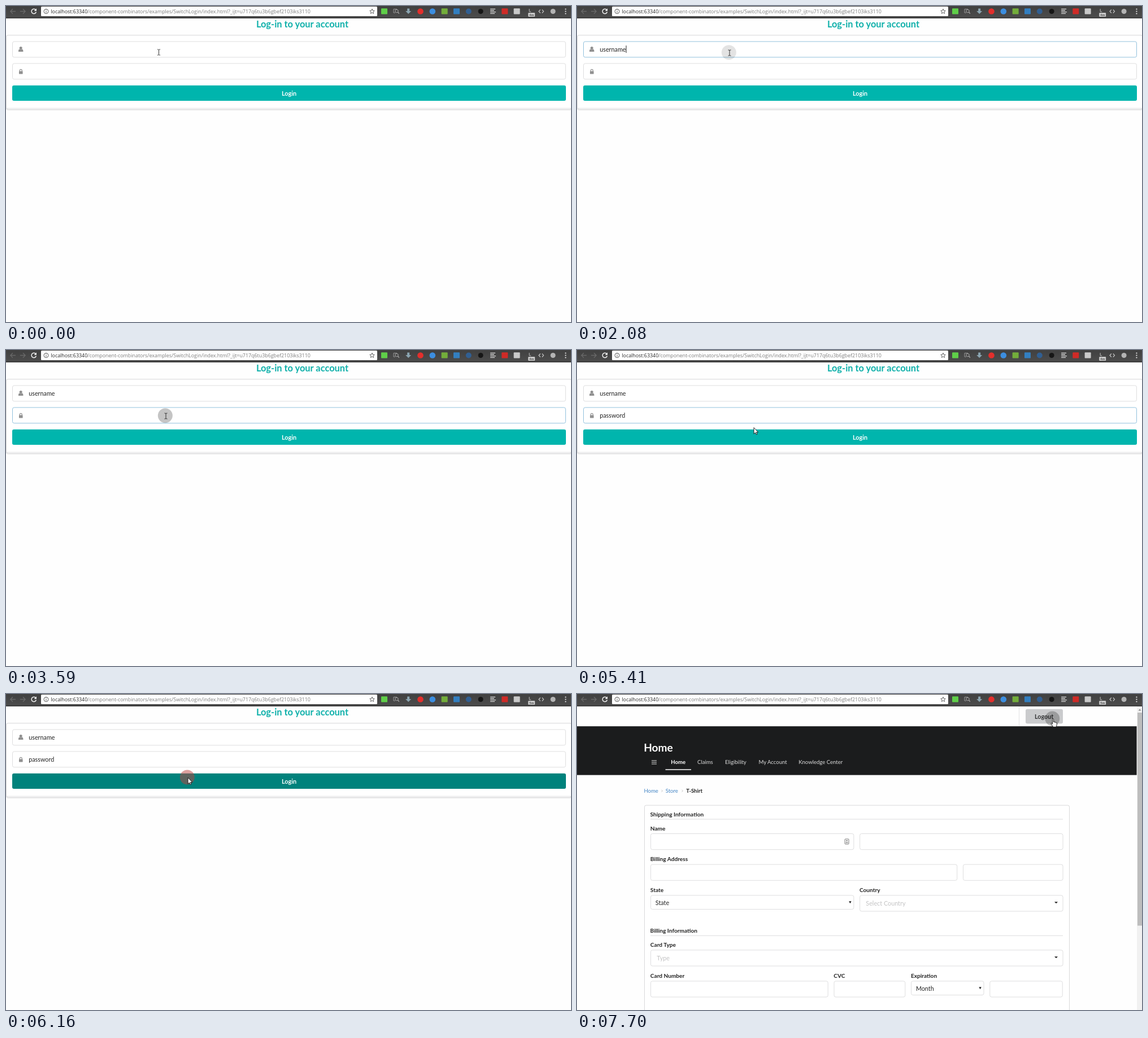
Recreate the animation shown at these times as an HTML page. Size 1000x560 px, loop 8000 ms.

```html
<!DOCTYPE html>
<html lang="en">
<head>
<meta charset="utf-8">
<title>Log-in</title>
<style>
html, body { margin: 0; width: 100%; height: 100%; overflow: hidden; background: #fefefe; }
svg { display: block; width: 100vw; height: 100vh; }
text { font-family: Lato, Carlito, sans-serif; font-size: 10.8px; fill: #222; white-space: pre; }
.url { font-family: "Open Sans", "Noto Sans", sans-serif; font-size: 8.88px; fill: #7d7d7d; }
.b { font-weight: 700; }
.label { font-weight: 700; font-size: 10.15px; }
.mid { text-anchor: middle; }
.menu { font-size: 9.55px; fill: #dcdcdc; }
.crumb { font-size: 9.5px; }
.link { fill: #4183c4; }
.white { fill: #fff; }
.hint { fill: #c3c3c4; }
.title { font-size: 16.4px; fill: #0fb0aa; }
.heading { font-size: 19.1px; }
.tiny { font-size: 6px; }
.field { fill: #fff; stroke: #dededf; }
.field.on { stroke: #92c1dd; }
</style>
</head>
<body>
<svg viewBox="0 0 1000 560" preserveAspectRatio="none">
  <defs>
    <linearGradient id="bar" x2="0" y2="1">
      <stop offset="0" stop-color="#404040"/><stop offset=".85" stop-color="#4b4b4b"/><stop offset="1" stop-color="#3a3a3a"/>
    </linearGradient>
  </defs>
  <rect width="1000" height="560" fill="#fefefe"/>
  <g id="login"></g>
  <g id="home"></g>
  <g id="chrome"></g>
  <g id="pointer">
    <circle id="halo" cx="-1.2" cy="-.7" r="13"/>
    <path id="beam" d="M-2.5-5H-1L0-4.3 1-5H2.5M0-4.3V4.3M-2.5 5H-1L0 4.3 1 5H2.5" fill="none" stroke="#333"/>
    <path id="arrow" d="M0 0V11.2L2.6 8.8 4.3 12.4 6 11.7 4.4 8.2H7.8Z" fill="#fff" stroke="#111" stroke-width=".9"/>
    <path id="hand" d="M-1 1C-1-.5 1-.5 1 1V5.5C1.2 4.5 3 4.6 3 6 3.3 5.1 5 5.3 5 6.7 5.4 5.9 6.8 6.3 6.8 7.5V10.5L5.6 14H.2L-3.4 8.8C-4.3 7.3-2.7 6.6-1.8 7.8L-1 9Z" fill="#fff" stroke="#111" stroke-width=".9"/>
  </g>
</svg>
<script>
const LOOP = 8000;
const $ = id => document.getElementById(id);
const rect = (x, y, r, b, attrs = 'class="field"', rx = 3) =>
  `<rect x="${x}" y="${y}" width="${r - x}" height="${b - y}" rx="${rx}" ${attrs}/>`;
const text = (x, y, s, cls = '', attrs = '') => `<text x="${x}" y="${y}" class="${cls}" ${attrs}>${s}</text>`;
const path = (d, color, w = 1) => `<path d="${d}" fill="none" stroke="${color}" stroke-width="${w}"/>`;
const shape = (d, color) => `<path d="${d}" fill="${color}"/>`;
const dot = (x, y, r, color) => `<circle cx="${x}" cy="${y}" r="${r}" fill="${color}"/>`;
const ring = (x, y, r, color) => `<circle cx="${x}" cy="${y}" r="${r}" fill="none" stroke="${color}"/>`;
const move = (x, y, s) => `<g transform="translate(${x} ${y})">${s}</g>`;

// Browser bar: extension icons sit at an even pitch, each drawn around its centre.
const tile = color => rect(-5.5, -5.3, 5.5, 5, `fill="${color}"`, 1);
const disc = (color, r = 5.3) => dot(0, 0, r, color);
const icons = [
  tile('#5fce49'),
  path('M-4.8 2.5V-4H1.2M-4.8 2.5H-1.8', '#999') + ring(.7, -.5, 2.7, '#aaa') + path('M2.7 1.5 5 4', '#aaa', 1.3),
  shape('M-2-5H2V-.5H5L0 4.5-5-.5H-2Z', '#8ba5b1'),
  disc('#e32f2c'), disc('#3c8ee0'), tile('#73ad3b'), tile('#337fc0'), disc('#315f92', 5), disc('#161616', 4.5),
  path('M-4.4-4.2H4.6M-4.4-1.5H2.6M-4.4 1.2H5.6M-4.4 3.9H3.6', '#d5d5d5', 1.3),
  tile('#cf2b27'), tile('#c9c9c9'),
  path('M.7-4.5V.5H3.7', '#bbb') + rect(-1.3, 2.5, 10.7, 9.5, 'fill="#c9c9c9"', 1) + text(4.7, 8.2, '', 'mid tiny', 'id="badge"'),
  path('M-1-3-3.8 0-1 3M2-3 4.8 0 2 3', '#c8c8c8', 1.1),
  disc('#b4b4b4', 4.5),
  dot(1, -4, 1.1, '#eee') + dot(1, 0, 1.1, '#eee') + dot(1, 4, 1.1, '#eee')
];
const star = Array.from({ length: 10 }, (_, i) => {
  const a = i * Math.PI / 5, r = i % 2 ? 2 : 4.5;
  return `${(r * Math.sin(a)).toFixed(2)} ${(-r * Math.cos(a)).toFixed(2)}`;
});

$('chrome').innerHTML = [
  rect(0, 0, 1000, 22, 'fill="url(#bar)"', 0),
  path('M17 9.5H8M12 5.3 7.8 9.5 12 13.7M25 9.5H34M30 5.3 34.2 9.5 30 13.7', '#686868', 1.3),
  path('M52.6 6.7A4.2 4.2 0 1 0 53.4 10.5', '#f2f2f2', 1.5),
  shape('M54 4.3V8.7H49.6Z', '#f2f2f2'),
  rect(62, 1, 657, 18, 'fill="#fff"', 1.5),
  ring(71, 9.5, 4, '#555'),
  path('M71 8.8V11.8M71 6.8V7.8', '#555'),
  text(79.3, 12.7, '<tspan fill="#2b2b2b">localhost:63340</tspan>/component-combinators/examples/SwitchLogin/index.html?_ijt=u717q6tu3b6gbef2103iks3110', 'url'),
  move(648, 9.7, path(`M${star.join('L')}Z`, '#555', .9)),
  ...icons.map((s, i) => move(669.5 + 21.33 * i, 9.5, s))
].join('');

const inputBox = (id, y) => rect(11.5, y, 990.5, y + 27.8, `class="field" id="${id}Box"`) + text(40.2, y + 17.9, '', '', `id="${id}"`);

$('login').innerHTML = [
  text(524.5, 38, 'Log-in to your account', 'b mid title'),
  rect(.5, 52.5, 1001, 184.3, 'fill="none" stroke="#e6e6e7"'),
  rect(.5, 51.8, 1001, 183.2, 'fill="#fff" stroke="#d6d6d7"'),
  path('M1 181.2H1000', '#e4e4e5'),
  inputBox('user', 63),
  inputBox('pass', 101.9),
  dot(26.2, 74.5, 2.5, '#909090'),
  shape('M22 81V79.3Q22 76.8 24.2 76.5 26.2 78 28.2 76.5 30.4 76.8 30.4 79.3V81Z', '#909090'),
  rect(23, 115.5, 29.6, 120.5, 'fill="#909090"', .6),
  path('M24.3 116V114.4A2 2 0 0 1 28.3 114.4V116', '#909090', 1.2),
  rect(0, 0, 1, 13, 'id="caret" fill="#222"', 0),
  rect(11, 140.7, 991, 168, 'id="button"'),
  text(501, 158.8, 'Login', 'b mid white')
].join('');

// A form row lays its fields out from left to right; a select has dark text, a menu a pale hint.
const LEFT = 130.5, RIGHT = 860, GAP = 10.8;
const drop = (x, y, w, h) => shape(`M${x - w} ${y - h / 2}H${x + w}L${x} ${y + h / 2}Z`, '#222');
function row(y, ...fields) {
  let x = LEFT;
  return fields.map(({ w, label = '', select, menu }) => {
    const r = x + w;
    let s = text(x - .7, y - 5.9, label, 'label') + rect(x, y, r, y + (select ? 24.7 : 28.2));
    if (select) s += text(x + 8.3, y + 17, select) + drop(r - 6.4, y + 12.4, 2.2, 4);
    if (menu) s += text(x + 10.7, y + 17.9, menu, 'hint') + drop(r - 12, y + 13, 3, 3);
    x = r + GAP;
    return s;
  }).join('');
}
const section = (y, title) => text(LEFT - .9, y, title, 'label') + path(`M${LEFT - .5} ${y + 5.2}H${RIGHT}`, '#dcdcdd');
const half = (RIGHT - LEFT - GAP) / 2;
const links = { Claims: 213, Eligibility: 262, 'My Account': 321.4, 'Knowledge Center': 392.2 };

$('home').innerHTML = [
  path('M782.5 22V57', '#e2e2e3'),
  rect(794, 26.8, 860, 52.5, 'id="logout"'),
  text(826.6, 43.5, 'Logout', 'b mid', 'id="logoutText"'),
  rect(0, 57.2, 990.6, 143.6, 'fill="#1b1c1d"', 0),
  text(118.2, 102, 'Home', 'b white heading'),
  path('M132 118H141M132 121H141M132 124H141', '#e4e4e4', 1.1),
  text(166.2, 124.4, 'Home', 'menu b white'),
  path('M156.5 134.1H202', '#fff', 1.5),
  ...Object.entries(links).map(([s, x]) => text(x, 124.4, s, 'menu')),
  text(118.4, 175, 'Home', 'crumb link'),
  text(156.8, 175, 'Store', 'crumb link'),
  text(193.3, 175, 'T-Shirt', 'b crumb'),
  path('M149.6 169.8 151.3 171.7 149.6 173.6M185.6 169.8 187.3 171.7 185.6 173.6', '#bbb', .9),
  rect(119.5, 197.2, 871.5, 600, 'fill="#fff" stroke="#d9d9da"'),
  section(216.7, 'Shipping Information'),
  row(247.5, { label: 'Name', w: half }, { w: half }),
  row(302.1, { label: 'Billing Address', w: 542.2 }, { w: 176.5 }),
  row(356.8, { label: 'State', w: half, select: 'State' }, { label: 'Country', w: half, menu: 'Select Country' }),
  section(423, 'Billing Information'),
  row(453.8, { label: 'Card Type', w: RIGHT - LEFT, menu: 'Type' }),
  row(508.8, { label: 'Card Number', w: 313.7 }, { label: 'CVC', w: 125.8 },
    { label: 'Expiration', w: 128.4, select: 'Month' }, { w: 128.4 }),
  '<g id="card">', rect(474.2, 257, 481, 266, 'fill="#fff" stroke="#777"', .8),
  dot(477.6, 260, 1.2, '#777'), path('M475.8 263.4H479.4', '#777', 1.5), '</g>',
  rect(991, 22, 1000, 560, 'fill="#f1f1f1"', 0),
  rect(992, 33, 1000, 410.5, 'fill="#bdbdbd"', 0),
  shape('M993.5 29.5 996 26.5 998.5 29.5Z', '#888')
].join('');

// The screen refreshes in even ticks; all times below count ticks.
const TICK = 151.7, PHASE = 90;
const ENTER = 41;
const clicks = [
  { at: 2, end: 16, focus: 'user' },
  { at: 22, end: 25, focus: 'pass' },
  { at: 40, end: 44 },
  { at: 49, end: 60 }
];
const typing = [
  { id: 'user', word: 'username', from: 8, to: 13, leave: 16 },
  { id: 'pass', word: 'password', from: 24, to: 31, leave: 31 }
];
// Pointer stops: tick, x, y.
const stops = [
  [0, 270.5, 82], [2, 270, 83], [16, 270, 83], [21, 283, 117], [33, 283, 117],
  [35, 313, 137.5], [37, 322, 148.2], [43, 322, 148.2], [49, 842.5, 44.3], [60, 842.5, 44.3]
];

const clamp = (v, lo, hi) => Math.min(hi, Math.max(lo, v));
const show = (id, on) => { $(id).style.display = on ? '' : 'none'; };

function pointerAt(n) {
  const i = stops.findIndex(s => s[0] > n);
  const [t0, x0, y0] = stops[i - 1], [t1, x1, y1] = stops[i];
  const u = (n - t0) / (t1 - t0), e = u * u * (3 - 2 * u);
  return [x0 + (x1 - x0) * e, y0 + (y1 - y0) * e];
}

function haloColor(n, click) {
  if (!click || n >= click.end) return 'none';
  const age = n - click.at;
  return age ? `rgba(0,0,0,${Math.max(.11, .27 - .04 * age)})` : 'rgba(187,65,62,.5)';
}

function draw(t) {
  const n = Math.max(0, Math.floor((t - PHASE) / TICK));
  const inside = n >= ENTER;
  const [x, y] = pointerAt(n);
  const click = clicks.findLast(c => c.at <= n);
  show('login', !inside);
  show('home', inside);
  show('card', n >= ENTER + 4);
  $('badge').textContent = n < 40 ? '4m' : '5m';

  show('caret', false);
  for (const { id, word, from, to, leave } of typing) {
    const done = clamp((n - from + 1) / (to - from + 1), 0, 1);
    $(id).textContent = word.slice(0, Math.floor(word.length * done));
    $(id + 'Box').classList.toggle('on', click?.focus === id);
    if (n >= from && n < leave) {
      show('caret', true);
      $('caret').setAttribute('x', 40.2 + $(id).getComputedTextLength());
      $('caret').setAttribute('y', $(id).getAttribute('y') - 10.8);
    }
  }

  const overButton = !inside && y > 141, overLogout = inside && x > 794 && y < 53;
  $('button').setAttribute('fill', !overButton ? '#00b5ad' : click.focus ? '#009c95' : '#00827c');
  $('logout').setAttribute('fill', overLogout ? '#cacbcd' : '#e0e1e2');
  $('logoutText').style.fill = overLogout ? '#333435' : '#626364';

  const kind = overLogout ? 'hand' : inside || y > 131 ? 'arrow' : 'beam';
  for (const id of ['beam', 'arrow', 'hand']) show(id, id === kind);
  $('halo').setAttribute('fill', haloColor(n, click));
  $('pointer').setAttribute('transform', `translate(${x} ${y})`);
}

const start = performance.now();
function tick() {
  draw((performance.now() - start) % LOOP);
  requestAnimationFrame(tick);
}
tick();
</script>
</body>
</html>
```
